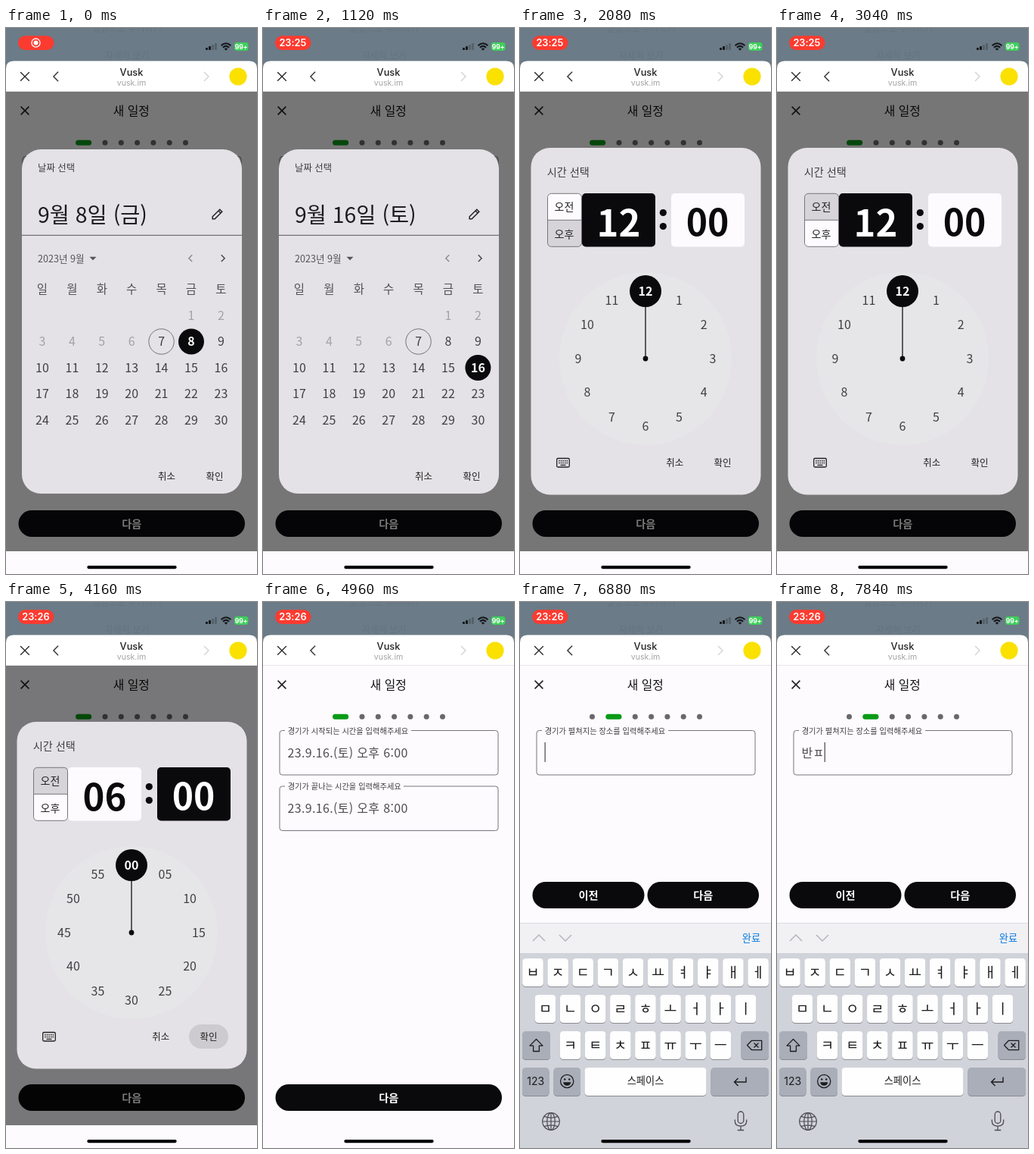
Animation, 332 px wide and 720 px high, one loop 8 s. Source, as an HTML page:

```html
<!DOCTYPE html>
<html lang="ko">
<head>
<meta charset="utf-8">
<title>새 일정</title>
<style>
  html, body { margin: 0; width: 100%; height: 100%; overflow: hidden; background: #fff; }
  svg { display: block; width: 100vw; height: 100vh; }
  text {
    font-family: "Noto Sans CJK KR", "Noto Sans CJK", "Noto Sans", sans-serif;
    font-variant-ligatures: no-contextual; white-space: pre;
  }
  .ui { font-family: Inter, sans-serif; }
</style>
</head>
<body>
<svg id="stage" viewBox="0 0 332 720"></svg>
<script>
const LOOP = 8000;
const INK = '#0a090c', PAPER = '#fdfbfe', SHEET = '#e4e2e6', BODY = '#3f3e41';
const $ = id => document.getElementById(id);

// ---- drawing helpers ----
const text = (x, cy, s, size, o = {}) =>
  `<text x="${x}" y="${cy + size * .37}" font-size="${size}" text-anchor="${o.a || 'middle'}" fill="${o.f || BODY}"` +
  ` font-weight="${o.w || 400}" class="${o.c || ''}" letter-spacing="${o.ls || 0}" ${o.id ? `id="${o.id}"` : ''}>${s}</text>`;
const rect = (x, y, w, h, r, fill, extra = '') =>
  `<rect x="${x}" y="${y}" width="${w}" height="${h}" rx="${r}" fill="${fill}" ${extra}/>`;
const circle = (x, y, r, fill, extra = '') => `<circle cx="${x}" cy="${y}" r="${r}" fill="${fill}" ${extra}/>`;
const line = (d, color, w = 1.4, extra = '') =>
  `<path d="${d}" fill="none" stroke="${color}" stroke-width="${w}" ${extra}/>`;
const group = (id, inner) => `<g id="${id}">${inner}</g>`;
const cross = (x, y, r, w) => line(`M${x - r} ${y - r}l${2 * r} ${2 * r}m0 ${-2 * r}l${-2 * r} ${2 * r}`, '#222', w);
const chevron = (x, y, dir, h, color, w) =>
  line(`M${x - dir * h / 2} ${y - h}l${dir * h} ${h}l${-dir * h} ${h}`, color, w);

// ---- phone frame ----
function statusBar() {
  const bars = [0, 1, 2, 3].map(i =>
    rect(264 + i * 4, 26 - i * 2, 3, 3 + i * 2, .7, '#15191c', i > 1 ? 'opacity=".25"' : '')).join('');
  const wifi = line('M284.5 23.2Q291 17.4 297.5 23.2M286.9 25.7Q291 22 295.1 25.7', '#15191c', 2) +
    '<path d="M288.7 27.4Q291 25.4 293.3 27.4L291 29.8Z" fill="#15191c"/>';
  return rect(0, 0, 332, 70, 0, '#6b7b87') +
    text(160, 1, '일정으로 추가하기', 12, { f: '#647480' }) + text(160, 37, '자세히 보기', 12, { f: '#647480' }) +
    rect(16, 10.3, 47.5, 18.6, 9.3, '#fb3b30') +
    group('record', circle(39.5, 19.6, 5.6, 'none', 'stroke="#fff" stroke-width="1.3"') + circle(39.5, 19.6, 3, '#fff')) +
    text(39.4, 19.7, '', 12.8, { f: '#fff', w: 600, c: 'ui', id: 'clock' }) +
    bars + wifi + rect(302, 19, 18.5, 11, 3.4, '#3ecf5b') +
    text(311.2, 24.6, '99+', 8.6, { f: '#fff', w: 700, c: 'ui' });
}

function browserBar() {
  return '<path d="M0 84V53.5Q0 43.5 10 43.5H322Q332 43.5 332 53.5V84Z" fill="#fff"/>' +
    line('M0 83.5H332', '#e6e5e8', 1) + cross(25, 64, 5.8, 1.3) +
    chevron(66, 64, -1, 6.2, '#333', 1.4) + chevron(265, 64, 1, 6, '#d2d2d5', 1.3) +
    text(166, 58, 'Vusk', 12.8, { f: '#222', w: 500, c: 'ui' }) +
    text(166, 72, 'vusk.im', 10.6, { f: '#a2a2a6', c: 'ui' }) + circle(307, 64, 11.6, '#fae100');
}

// ---- form ----
const field = (id, y, label) => group(id,
  rect(22, y + .5, 289, 58.5, 3.5, 'none', 'stroke="#77757a"') +
  rect(29, y - 2, 0, 5, 0, PAPER, `id="${id}-notch"`) +
  text(32.7, y + 30, label, 13.65, { a: 'start', id: `${id}-label` }) +
  text(32.5, y + 30, '', 16, { a: 'start', f: '#4c4b4e', ls: .33, id: `${id}-value` }));

function setField(id, y, p, notch, value) {
  const size = 13.65 - 3.4 * p, label = $(`${id}-label`);
  label.setAttribute('font-size', size);
  label.setAttribute('y', y + 30 - 29 * p + size * .37);
  $(`${id}-notch`).setAttribute('width', notch * p);
  $(`${id}-value`).textContent = value;
}

const button = (x, w, label) =>
  rect(x, 636, w, 35, 17.5, INK) + text(x + w / 2, 653.3, label, 14.2, { f: '#fff', w: 700 });

function page() {
  const dots = Array.from({ length: 7 }, (_, i) => rect(0, 147.7, 7, 7, 3.5, '#69676b', `id="dot${i}"`)).join('');
  return rect(0, 84, 332, 636, 0, PAPER) + cross(25, 109, 5.4, 1.6) +
    text(165.7, 109, '새 일정', 15.8, { f: '#111', w: 500 }) + dots +
    group('step0', field('start', 169, '경기가 시작되는 시간을 입력해주세요') +
      field('end', 242.5, '경기가 끝나는 시간을 입력해주세요') + button(16.5, 299.5, '다음')) +
    group('step1', field('place', 169, '경기가 펼쳐지는 장소를 입력해주세요') +
      rect(32.5, 185, 1.3, 26, 0, '#555', 'id="caret"') +
      group('nav', button(16.5, 148, '이전') + button(168.5, 147.5, '다음')));
}

// ---- dialogs ----
const dialog = (id, inner) => group(`${id}-shade`, rect(0, 84, 332, 606, 0, '#000', 'opacity=".53"')) + group(id, inner);
const actions = (cancelX, okX, y, id) =>
  rect(okX - 26, y - 16, 52, 32, 16, '#000', `opacity=".1" id="${id}"`) +
  text(cancelX, y, '취소', 12.5, { f: '#222' }) + text(okX, y, '확인', 12.5, { f: '#222' });

function days(selected, title) {
  let out = text(42, 246.5, title, 28.4, { a: 'start', f: '#1b1b1e' });
  for (let d = 1; d <= 30; d++) {
    const cell = d + 4, x = 48 + (cell % 7) * 39.4, y = 379 + Math.floor(cell / 7) * 34.5, on = d === selected;
    if (on) out += circle(x, y, 17, INK);
    if (d === 7) out += circle(x, y, 16.7, 'none', 'stroke="#666" stroke-width=".9"');
    out += text(x, y, d, 16, { f: on ? '#fff' : d < 7 ? '#a3a1a5' : BODY, w: on ? 700 : 400 });
  }
  return out;
}

function dateDialog() {
  return rect(21, 160, 291, 454, 25, SHEET) +
    text(42, 184, '날짜 선택', 12.4, { a: 'start' }) +
    line('M21 273.3H312', '#58565a', 1) +
    line('M273.2 251.8v-3l9.6-9.6 3 3-9.6 9.6zM281 241l3 3', '#222', 1.5) +
    text(42, 304, '2023년 9월', 12.6, { a: 'start', f: '#555357' }) +
    '<path d="M110.5 301.7h9l-4.5 4.6z" fill="#555357"/>' +
    chevron(244, 303.7, -1, 4.4, '#8a888c', 1.4) + chevron(287, 303.7, 1, 4.4, '#444', 1.4) +
    [...'일월화수목금토'].map((s, i) => text(48 + i * 39.4, 344.5, s, 15.5, { f: '#555357' })).join('') +
    group('day8', days(8, '9월 8일 (금)')) + group('day16', days(16, '9월 16일 (토)')) +
    actions(212.5, 276, 591, 'dateOk');
}

function dial(selected, label) {
  const at = (i, r) => [166 + r * Math.sin(i * Math.PI / 6), 436 - r * Math.cos(i * Math.PI / 6)];
  const [hx, hy] = at(selected, 89);
  let out = line(`M166 436L${hx} ${hy}`, '#222', 1.4) + circle(166, 436, 3.4, INK) + circle(hx, hy, 21, INK);
  for (let i = 1; i <= 12; i++) {
    const on = i === selected;
    out += text(...at(i, 89), label(i), 16, { f: on ? '#fff' : BODY, w: on ? 700 : 400 });
  }
  return out;
}

function timeDialog() {
  const keys = [0, 1].flatMap(r => [0, 1, 2, 3, 4].map(c => rect(51.2 + c * 2.6, 570 + r * 2.8, 1.5, 1.5, 0, '#222'))).join('');
  return rect(14.5, 158, 304, 457.5, 25, SHEET) +
    text(35.7, 190, '시간 선택', 14.2, { a: 'start' }) +
    rect(36.5, 218.3, 45, 35, 4, SHEET, 'id="am"') + rect(36.5, 253.3, 45, 35, 4, SHEET, 'id="pm"') +
    rect(36.5, 218.3, 45, 70, 5, 'none', 'stroke="#77757a"') + line('M36.5 253.3h45', '#77757a', 1) +
    text(58.5, 236, '오전', 14, { f: '#222' }) + text(58.5, 271.5, '오후', 14, { f: '#222' }) +
    rect(82, 218, 97, 70.5, 5, INK, 'id="hourBox"') + rect(200, 218, 97, 70.5, 5, PAPER, 'id="minuteBox"') +
    text(130.5, 256.7, '12', 49, { w: 700, id: 'hour' }) + text(248, 256.7, '00', 48, { w: 700, id: 'minute' }) +
    circle(189.3, 243.5, 4.6, INK) + circle(189.3, 261.5, 4.6, INK) +
    circle(166, 436, 114, '#e6e5e8') +
    group('dial12', dial(12, i => i)) + group('dial6', dial(6, i => i)) +
    group('dialMin', dial(12, i => String(i % 12 * 5).padStart(2, '0'))) +
    rect(48.7, 567.5, 16.6, 11.5, 1.5, 'none', 'stroke="#222" stroke-width="1.3"') + keys +
    line('M53.5 576.4h7', '#222', 1.3) + actions(204.7, 268, 573, 'timeOk');
}

// ---- keyboard ----
function keyboard() {
  const GREY = '#a9aeb9', DARK = '#1c1c1e';
  const key = (x, y, w, fill) => rect(x, y + 1, w, 37, 4.6, '#898b90') + rect(x, y, w, 37, 4.6, fill);
  const row = (letters, x0, y) => [...letters].map((s, i) => {
    const x = x0 + i * 33.12;
    return key(x - 13.8, y, 27.6, '#fefefe') + text(x, y + 18.5, s, 18.5, { f: DARK });
  }).join('');
  return rect(0, 423, 332, 297, 0, '#d1d3da') + rect(0, 423, 332, 40, 0, '#f1f1f4') + line('M0 423.5H332', '#dcdce0', 1) +
    line('M17 447l8-8 8 8M52 439l8 8 8-8', '#b5b5ba', 1.5) +
    text(306, 443, '완료', 13.2, { f: '#0a7be0' }) +
    row('ㅂㅈㄷㄱㅅㅛㅕㅑㅐㅔ', 17, 470) + row('ㅁㄴㅇㄹㅎㅗㅓㅏㅣ', 33.5, 518) + row('ㅋㅌㅊㅍㅠㅜㅡ', 66.6, 566) +
    key(3, 566, 37, GREY) + line('M21.5 576.5l8.5 8.6h-4.6v7.4h-7.8v-7.4h-4.6z', DARK, 1.3, 'stroke-linejoin="round"') +
    key(292.5, 566, 36.5, GREY) +
    line('M300.5 584.5l6-6.2h13.2v12.4h-13.2zM309.5 581.5l6 6m0-6l-6 6', DARK, 1.3, 'stroke-linejoin="round"') +
    key(3, 614, 35.5, GREY) + text(20.8, 632, '123', 14, { f: DARK, c: 'ui' }) +
    key(44.5, 614, 35.5, GREY) + circle(62.2, 632, 8.6, 'none', `stroke="${DARK}" stroke-width="1.3"`) +
    circle(59.2, 629.5, 1.2, DARK) + circle(65.2, 629.5, 1.2, DARK) + `<path d="M57 633.2h10.4q-1 4.6-5.2 4.6t-5.2-4.6z" fill="${DARK}"/>` +
    key(85.5, 614, 161, '#fefefe') + text(166, 631.5, '스페이스', 13.2, { f: DARK }) +
    key(252.5, 614, 76.5, GREY) + line('M299 626.5v6.5h-15.5m5-5l-5 5 5 5', DARK, 1.4) +
    circle(41, 685, 11.3, 'none', 'stroke="#4b4d53" stroke-width="1.2"') +
    '<ellipse cx="41" cy="685" rx="5.2" ry="11.3" fill="none" stroke="#4b4d53" stroke-width="1.2"/>' +
    line('M41 673.7v22.6M29.7 685h22.6M32 678.4q9 3.4 18 0M32 691.6q9-3.4 18 0', '#4b4d53', 1.2) +
    rect(288.2, 672, 7.6, 15.5, 3.8, 'none', 'stroke="#4b4d53" stroke-width="1.3"') +
    line('M284.3 682.5v2q0 6.6 7.7 6.6t7.7-6.6v-2M292 691v5.5m-4.2 0h8.4', '#4b4d53', 1.3);
}

$('stage').innerHTML = statusBar() + page() + browserBar() + dialog('date', dateDialog()) + dialog('time', timeDialog()) +
  group('keyboard', keyboard()) + rect(107.3, 709, 118.4, 4.2, 2.1, '#000');

// ---- timeline ----
const ease = x => x * x * (3 - 2 * x);
const ramp = (t, start, length) => ease(Math.min(1, Math.max(0, (t - start) / length)));
const pick = (t, steps) => steps.filter(([from]) => t >= from).pop()[1];
const show = (id, on) => $(id).setAttribute('display', on ? 'inline' : 'none');
const fill = (id, color) => $(id).setAttribute('fill', color);

// The shade and the sheet fade apart, so the shade also dims what shows through the sheet.
function fadeDialog(id, alpha) {
  for (const part of [id, `${id}-shade`]) {
    $(part).setAttribute('opacity', alpha);
    show(part, alpha > 0);
  }
}

function render(t) {
  const clock = pick(t, [[0, ''], [640, '23:25'], [4000, '23:26']]);
  $('clock').textContent = clock;
  show('record', !clock);

  show('day8', t < 640);
  show('day16', t >= 640);
  show('dateOk', t >= 1400);
  fadeDialog('date', 1 - ramp(t, 1680, 245));
  fadeDialog('time', ramp(t, 1600, 225) * (1 - ramp(t, 4160, 200)));

  const pm = t >= 2720, minutes = t >= 3760;
  fill('am', pm ? '#d6d4d8' : PAPER);
  fill('pm', pm ? PAPER : '#d6d4d8');
  fill('hourBox', minutes ? PAPER : INK);
  fill('minuteBox', minutes ? INK : PAPER);
  fill('hour', minutes ? INK : '#fff');
  fill('minute', minutes ? '#fff' : INK);
  $('hour').textContent = t < 3520 ? '12' : '06';
  show('dial12', t < 3520);
  show('dial6', t >= 3520 && !minutes);
  show('dialMin', minutes);
  show('timeOk', t >= 4080);

  const filled = t >= 4160, label = ramp(t, 4160, 200);
  setField('start', 169, label, 167, filled ? '23.9.16.(토) 오후 6:00' : '');
  setField('end', 242.5, label, 157, filled ? '23.9.16.(토) 오후 8:00' : '');

  const step = t < 5360 ? 0 : 1;
  show('step0', step === 0);
  show('step1', step === 1);
  for (let i = 0; i < 7; i++) {
    const dot = $(`dot${i}`);
    dot.setAttribute('x', 92 + i * 21.3 + (i > step ? 14.2 : 0));
    dot.setAttribute('width', i === step ? 21.2 : 7);
    fill(`dot${i}`, i === step ? '#0a9a17' : '#69676b');
  }

  const typed = pick(t, [[0, ''], [7040, 'ㅂ'], [7200, '바'], [7440, '반'], [7680, '반ㅍ']]);
  setField('place', 169, ramp(t, 6240, 200), 167, typed);
  show('caret', t >= 6300);
  $('caret').setAttribute('x', 32.5 + (typed && step ? $('place-value').getComputedTextLength() : 0));

  const up = ramp(t, 6320, 340);
  show('keyboard', up > 0);
  $('keyboard').setAttribute('transform', `translate(0 ${297 * (1 - up)})`);
  $('nav').setAttribute('transform', `translate(0 ${-267 * up})`);
}

const began = performance.now();
(function frame() {
  render((performance.now() - began) % LOOP);
  requestAnimationFrame(frame);
})();
</script>
</body>
</html>
```
